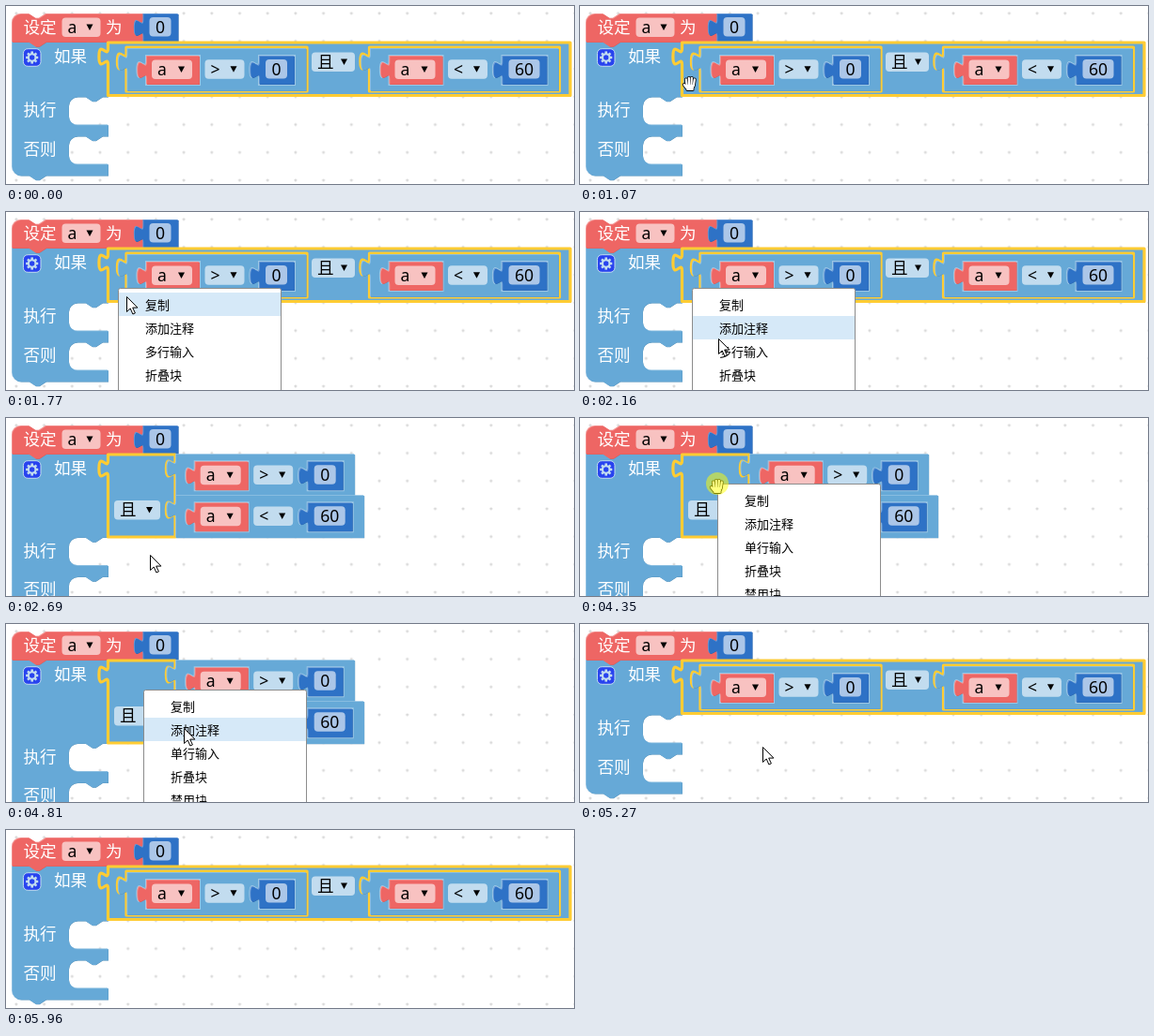
An HTML page that plays this animation: 604x190 px, repeating every 6.74 s.

```html
<!DOCTYPE html>
<html lang="zh">
<head>
<meta charset="utf-8">
<style>
html, body { margin: 0; width: 100%; height: 100%; overflow: hidden; background: #fff; }
svg { display: block; }
text { font: 17.6px "Noto Sans", "Noto Sans CJK SC", "Noto Sans CJK", sans-serif; white-space: pre; }
.menu text { font-size: 13px; }
</style>
</head>
<body>
<svg id="stage" width="604" height="190" viewBox="0 0 604 190">
  <defs>
    <pattern id="grid" x="-3.9" y="-7" width="29.7" height="29.7" patternUnits="userSpaceOnUse">
      <path d="M13.3 14.8h3M14.8 13.3v3" stroke="#d4d4d4" stroke-width="1.2"/>
    </pattern>
  </defs>
  <rect width="604" height="190" fill="url(#grid)"/>
  <g id="inline"></g>
  <g id="stacked"></g>
  <g id="overlay"></g>
</svg>
<script>
const LOOP = 6740, STEP = 76;
const RED = '#ee6664', SKY = '#66a9d7', BLUE = '#2e72c6', GOLD = '#fc3';
const $ = id => document.getElementById(id);

// Puzzle edges: side tab going down or up, notch going right or left
const TAB = 'v6c0,12 -9.6,-9.6 -9.6,9s9.6,-3 9.6,9';
const TAB_UP = 'c0,-12 -9.6,9.6 -9.6,-9s9.6,3 9.6,-9v-6';
const NOTCH = 'l7.2,4.8h3.6l7.2,-4.8';
const NOTCH_BACK = 'l-7.2,4.8h-3.6l-7.2,-4.8';

const plug = (x, y, w, h) => `M${x},${y}${TAB}V${y + h}H${x + w}V${y}z`;
const outline = d => `<path d="${d}" fill="none" stroke="${GOLD}" stroke-width="3.2" stroke-linejoin="round"/>`;
const text = (x, y, s, fill = '#000', anchor = 'start') =>
  `<text x="${x}" y="${y}" fill="${fill}" text-anchor="${anchor}">${s}</text>`;
const label = (x, y, s) => text(x, y, s, '#fff');

// Body with a light upper-left edge and a dark lower-right edge
const shape = (d, fill) =>
  `<path d="${d}" fill="${fill}" style="filter:brightness(.82)" transform="translate(1 1)"/>
   <path d="${d}" fill="${fill}"/>
   <path d="${d}" fill="#fff" opacity=".3"/>
   <path d="${d}" fill="${fill}" transform="translate(.8 .8)"/>`;

const field = (x, y, w) => `<rect x="${x}" y="${y}" width="${w}" height="20.5" rx="4" fill="#fff" opacity=".6"/>`;
const dropdown = (x, y, w, s) => field(x, y, w) + text(x + 6, y + 16.2, s) +
  `<path d="M${x + w - 15},${y + 7}h7l-3.5,6.5z"/>`;
const socket = (x, y, w) =>
  `<path d="${plug(x, y, w, 31)}" fill="none" stroke="#fff" stroke-opacity=".35" stroke-width="2"/>`;

function number(x, y, s) {
  const w = 27 + 10 * s.length;
  return shape(plug(x, y, w, 30), BLUE) + field(x + 7, y + 4, w - 14) +
    text(x + w / 2, y + 20.7, s, '#000', 'middle');
}

const variable = (x, y) => shape(plug(x, y, 56, 30), RED) + dropdown(x + 6, y + 4.5, 43, 'a');

function compare(x, y, op, value) {
  const digits = 10 * value.length;
  return shape(plug(x, y, 180 + digits, 45), SKY) +
    socket(x + 20.5, y + 8, 57) + socket(x + 140.5, y + 8, 28 + digits) +
    variable(x + 20.5, y + 8) + dropdown(x + 83, y + 12.3, 42, op) +
    number(x + 140.5, y + 8, value);
}

const mouth = y => `V${y}H102${NOTCH_BACK}h-8.4a9.6,9.6 0 0 0 -9.6,9.6v10.8a9.6,9.6 0 0 0 9.6,9.6H108`;

function gear(x, y) {
  let teeth = '';
  for (let a = 0; a < 360; a += 45)
    teeth += `<rect x="-1.3" y="-6.6" width="2.6" height="3.5" transform="rotate(${a})"/>`;
  return `<g transform="translate(${x} ${y})" fill="#fff" opacity=".6">
    <rect x="-9.3" y="-9.3" width="18.6" height="18.6" rx="4.8" fill="#00f" stroke="#fff"/>
    ${teeth}<circle r="4.8"/><circle r="2.7" fill="#00f"/></g>`;
}

// Set block and if/else block; top is the y of the first statement mouth
function frame(top) {
  const ifPath = `M6,38H24${NOTCH}H108${mouth(top)}${mouth(top + 42)}v12H42${NOTCH_BACK}H15.6a9.6,9.6 0 0 1 -9.6,-9.6z`;
  const setPath = `M6,17.6a9.6,9.6 0 0 1 9.6,-9.6H24${NOTCH}H146V38H42${NOTCH_BACK}H6z`;
  return shape(ifPath, SKY) + shape(setPath, RED) +
    label(18.5, 29, '设定') + dropdown(59.5, 12.5, 41, 'a') + label(106, 29, '为') + number(145.5, 8, '0') +
    gear(27.7, 55) + label(51, 60, '如果') +
    label(18.5, top + 20.5, '执行') + label(18.5, top + 62, '否则');
}

const wide = plug(108.5, 39, 491.5, 56.5);
$('inline').innerHTML = frame(96.5) + shape(wide, SKY) + outline(wide) +
  outline(plug(128, 44, 192, 47)) + outline(plug(386.5, 44, 202, 47)) +
  dropdown(325, 49.5, 46, '且') +
  compare(128.5, 45, '&gt;', '0') + compare(387, 45, '&lt;', '60');

const tall = `M108.5,39${TAB}V127H180V107${TAB_UP}V63${TAB_UP}z`;
$('stacked').innerHTML = frame(127) + shape(tall, SKY) + outline(tall) +
  dropdown(115, 88, 49, '且') +
  compare(180.2, 38.3, '&gt;', '0') + compare(180.2, 82.3, '&lt;', '60');

// Pointer path: each move runs from the previous end to (x, y)
const entry = { x: 390, y: 160 };
const moves = [
  { from: 150, to: 640, x: 38, y: 66 },
  { from: 690, to: 760, x: 89, y: 72 },
  { from: 840, to: 1070, x: 117, y: 80 },
  { from: 1220, to: 1220, x: 119, y: 81 },
  { from: 1770, to: 2160, x: 147, y: 135 },
  { from: 2460, to: 2540, x: 153, y: 146 },
  { from: 2860, to: 3240, x: 126, y: 62 },
  { from: 3560, to: 3790, x: 136, y: 64 },
  { from: 3960, to: 4030, x: 146, y: 70 },
  { from: 4580, to: 4960, x: 194, y: 131 },
  { from: 5580, to: 5960, x: 464, y: 200 }
];
// Menus open and close with a click at the pointer
const menus = [
  { open: 1300, pick: 2610, x: 119, y: 81, mode: '多行输入' },
  { open: 4350, pick: 5190, x: 146, y: 70, mode: '单行输入' }
];

function pointerAt(t) {
  const i = moves.findLastIndex(m => t >= m.from);
  if (i < 0) return null;
  const { from, to, x, y } = moves[i], start = moves[i - 1] || entry;
  const steps = Math.round((to - from) / STEP) + 1;
  const u = Math.min(1, (Math.floor((t - from) / STEP) + 1) / steps);
  const ease = 1 - (1 - u) ** 2;
  return { x: start.x + (x - start.x) * ease, y: start.y + (y - start.y) * u };
}

function menuMarkup({ x, y, mode }, pos) {
  const row = pos.x > x ? Math.floor((pos.y - y - 5) / 25) : -1;
  const items = ['复制', '添加注释', mode, '折叠块', '禁用块'];
  return `<g class="menu"><rect x="${x + .5}" y="${y + .5}" width="173" height="150" rx="2" fill="#fff" stroke="#8c8c8c"/>` +
    (row >= 0 ? `<rect x="${x + 1}" y="${y + 5 + row * 25}" width="172" height="25" fill="#d6e9f8"/>` : '') +
    items.map((s, i) => text(x + 29, y + 23 + i * 25, s)).join('') + '</g>';
}

const arrow = '<path d="M.5,.5V16.5l3.7,-3.5 2.7,6 2.5,-1.1 -2.7,-5.8h5.2z" fill="#fff" stroke="#000" stroke-linejoin="round"/>';

// Open hand: thumb, palm and four fingers as round strokes, black under white
function handMarkup() {
  let d = 'M-3,8L-6.3,4';
  for (let i = 0; i < 4; i++) {
    const x = 3 * i - 4.2, tip = 0.8 * (i - 1.5) ** 2 - 3.4;
    d += `M${x * 0.8},5L${x},${tip}`;
  }
  for (let y = 5; y <= 9; y += 2) d += `M${y / 4 - 5},${y}H${5 - y / 4}`;
  const stroke = (color, w) =>
    `<path d="${d}" fill="none" stroke="${color}" stroke-width="${w}" stroke-linecap="round"/>`;
  return stroke('#000', 3.8) + stroke('#fff', 2.2);
}
const hand = handMarkup();

function draw(now) {
  const t = now % LOOP;
  const stacked = t >= menus[0].pick && t < menus[1].pick;
  $('inline').style.display = stacked ? 'none' : '';
  $('stacked').style.display = stacked ? '' : 'none';

  const pos = pointerAt(t);
  let out = '';
  if (pos) {
    const menu = menus.find(m => t >= m.open && t < m.pick);
    const inMenu = menu && pos.x > menu.x && pos.y > menu.y;
    const onBlock = pos.y < (stacked ? 128 : 97) || pos.x < 66;
    const clicked = menus.some(m => [m.open, m.pick].some(c => t >= c && t < c + 80));
    if (menu) out += menuMarkup(menu, pos);
    out += `<g transform="translate(${Math.round(pos.x)} ${Math.round(pos.y)})">` +
      (onBlock && !inMenu ? hand : arrow) +
      (clicked ? '<circle r="12" fill="#ff0" opacity=".5"/>' : '') + '</g>';
  }
  $('overlay').innerHTML = out;
}

const start = performance.now();
function tick() {
  draw(performance.now() - start);
  requestAnimationFrame(tick);
}
tick();
</script>
</body>
</html>
```
